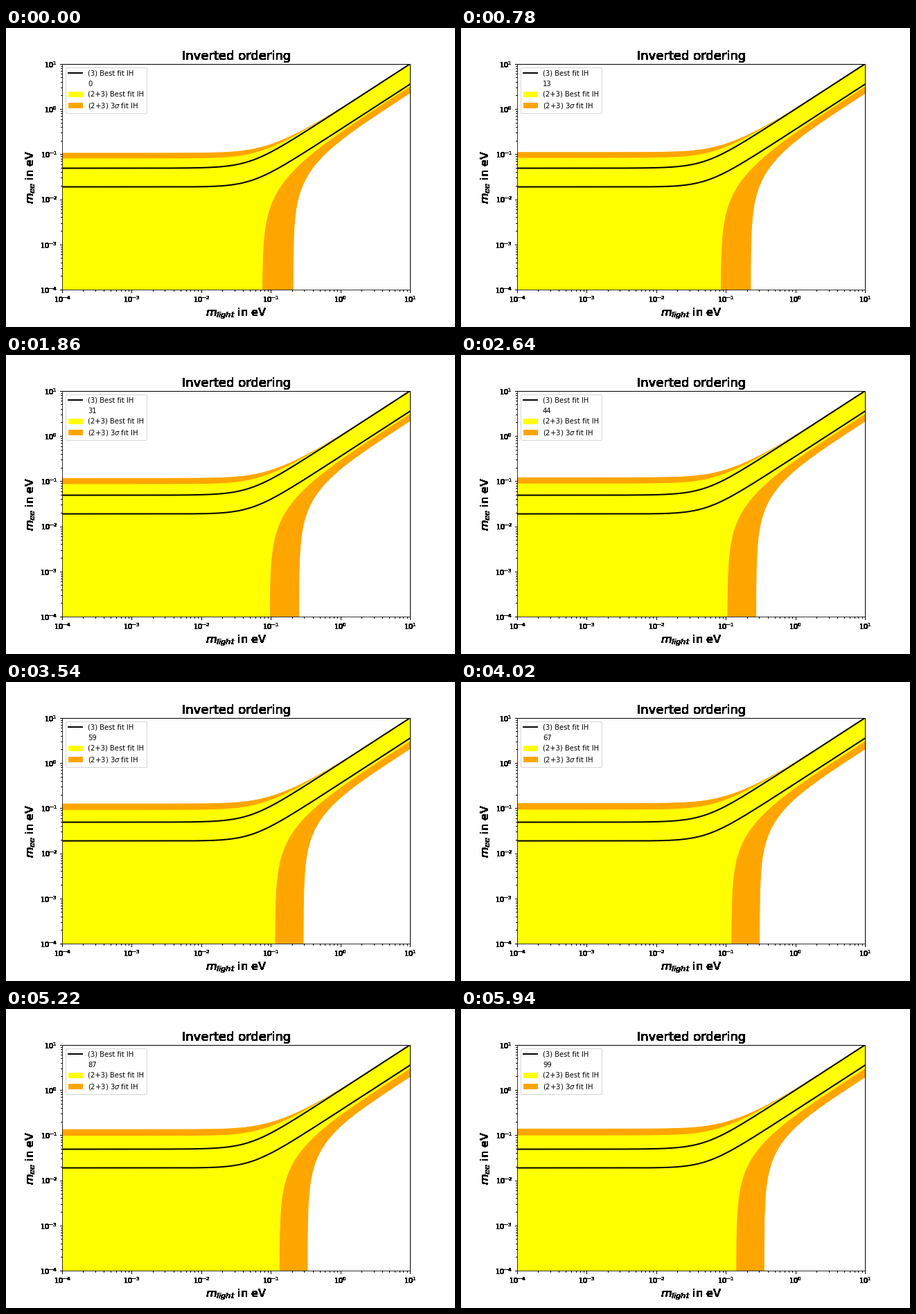
A matplotlib script that plays this animation: 648x432 px, repeating every 6 s.

```python
import numpy as np
import matplotlib.pyplot as plt
from matplotlib.animation import FuncAnimation

FRAMES = 100
STERILE_MASS = 1.3
m = np.logspace(-4, 1, 2000)


def active(split, c13, cos2):
    """Largest and smallest three-neutrino mass for a mass splitting."""
    heavy = np.sqrt(m**2 + split)
    s13 = 1 - c13
    return c13 * heavy + s13 * m, c13 * cos2 * heavy - s13 * m


def with_sterile(limits, mix):
    """Add a sterile share to the active limits."""
    high, low = limits
    extra = mix * np.sqrt(m**2 + STERILE_MASS**2)
    low = np.maximum((1 - mix) * low - extra, 1e-7)
    return low, (1 - mix) * high + extra


def hard_black(img, dpi):
    """Turn every touched pixel solid black."""
    out = np.zeros_like(img)
    out[..., 3] = img[..., 3] > 0
    return out, 0, 0


def outline(low, high):
    x = np.concatenate([m, m[::-1]])
    return [np.column_stack([x, np.concatenate([low, high[::-1]])])]


best = active(2.5e-3, 0.978, 0.386)
wide = active(2.6e-3, 0.9775, 0.315)

fig = plt.figure(figsize=(9, 6), dpi=72, facecolor="white")
fig.subplots_adjust(left=0.125, right=0.9, bottom=0.125, top=0.88)
ax = fig.add_subplot()
ax.set(xscale="log", yscale="log", xlim=(1e-4, 10), ylim=(1e-4, 10))
ax.set_title("Inverted ordering", fontsize=18)
ax.set_xlabel("$m_{light}$ in eV", fontsize=16)
ax.set_ylabel("$m_{ee}$ in eV", fontsize=16)
for part in (ax.title, ax.xaxis, ax.yaxis, ax.spines.top, ax.spines.right):
    part.set_agg_filter(hard_black)

orange = ax.fill_between(m, *with_sterile(wide, 0.0442), color="orange")
yellow = ax.fill_between(m, *with_sterile(best, 0.0241), color="yellow")
for curve in best:
    line, = ax.plot(m, curve, color="black", lw=2)
blank, = ax.plot([], [], " ")

legend = ax.legend(
    [line, blank, yellow, orange],
    ["(3) Best fit IH", "0", "(2+3) Best fit IH", r"(2+3) $3\sigma$ fit IH"],
    loc="upper left", fontsize=10)
counter = legend.get_texts()[1]


def update(i):
    orange.set_verts(outline(*with_sterile(wide, 0.0442 + 0.00026 * i)))
    yellow.set_verts(outline(*with_sterile(best, 0.0241 + 0.000147 * i)))
    counter.set_text(str(i))
    return orange, yellow, counter


anim = FuncAnimation(fig, update, frames=FRAMES, interval=60,
                     repeat=True, repeat_delay=0)
plt.show()
```
